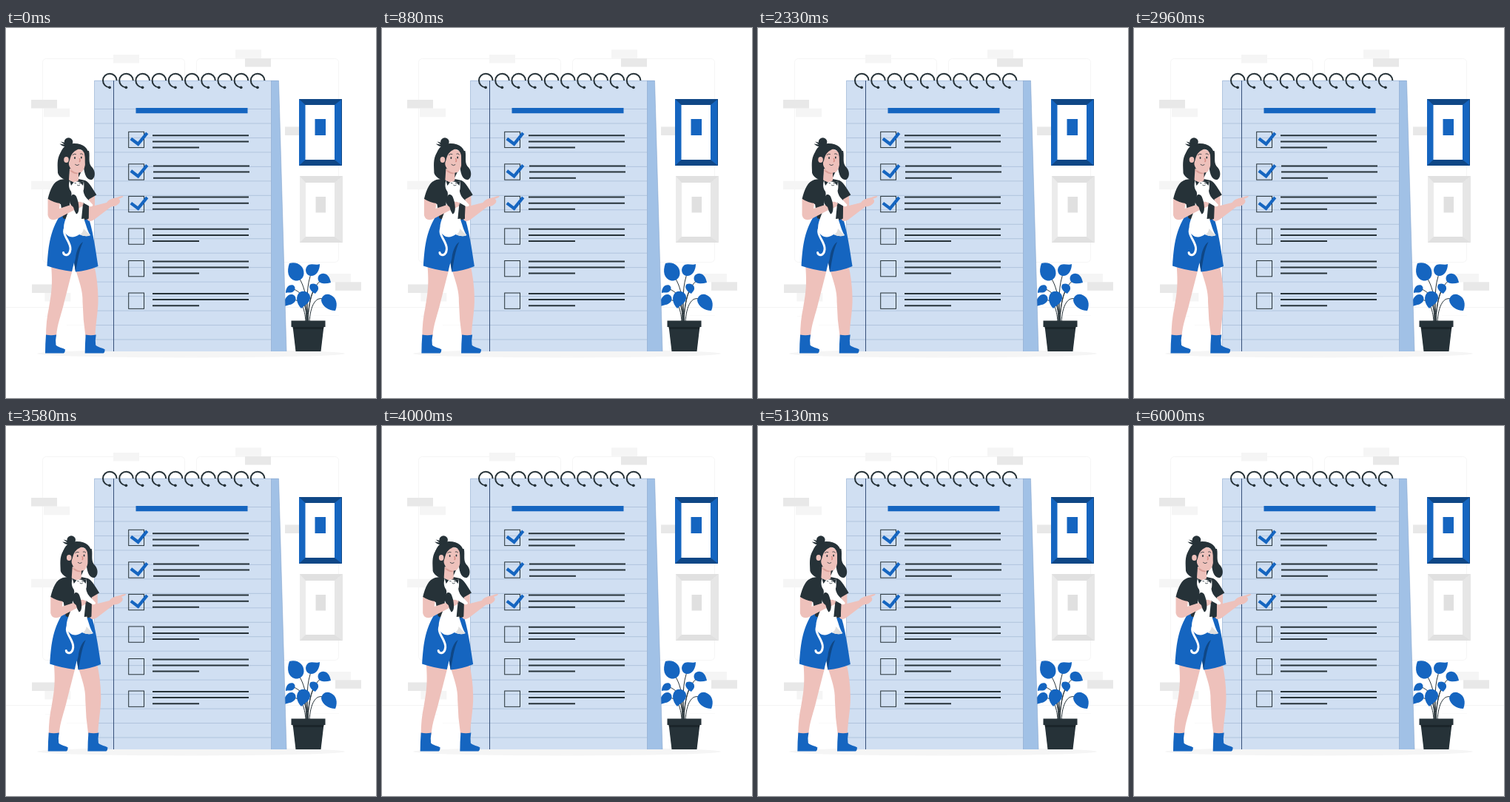
These frames come from a looping animation (500 by 500 pixels, 6.04 s). An HTML page:

```html
<!DOCTYPE html>
<html lang="en">
<head>
<meta charset="utf-8">
<title>Checklist</title>
<style>
  html, body { margin: 0; width: 100%; height: 100%; overflow: hidden; background: #fff; }
  svg { display: block; width: 100vw; height: 100vh; }
  .blue { fill: #1565c0; }
  .navy { fill: #0f4786; }
  .dark { fill: #263238; }
  .skin { fill: #eec1bb; }
  .white { fill: #fff; }
  .line { fill: none; stroke: #263238; }
</style>
</head>
<body>
<svg viewBox="0 0 500 500">
  <g id="wall">
    <g fill="none" stroke="#f3f3f3" stroke-width=".8">
      <rect x="49.5" y="41.5" width="192" height="275" rx="5"/>
      <rect x="257.5" y="41.5" width="192" height="275" rx="5"/>
      <path d="M0 377.5H500" stroke="#ededed" stroke-width=".6"/>
      <path d="M53 389.5H75M82 401.5H119M416 388.5H450" stroke-width=".5"/>
    </g>
  </g>
  <ellipse cx="250" cy="440" rx="208" ry="5.4" fill="#f5f5f5"/>

  <g id="pictures">
    <path class="blue" d="M396 96H454V186H396Z"/>
    <path class="navy" d="M396 96H454L444 104H404.500ZM396 186H454L444 178H404.500ZM453 96H454V186H453Z"/>
    <path class="white" d="M404.500 104H444V178H404.500Z"/>
    <path class="blue" d="M417.500 123H432V145H417.500Z"/>
    <path fill="#ebebeb" d="M397 200H455V290H397Z"/>
    <path fill="#e0e0e0" d="M397 200H455L444 209H405ZM397 290H455L444 282H405Z"/>
    <path fill="#e6e6e6" d="M455 200V290L444 282V209Z"/>
    <path class="white" d="M405 209H444V282H405Z"/>
    <path fill="#e0e0e0" d="M418.500 228H432V249.500H418.500Z"/>
  </g>

  <g id="plant">
    <path class="line" stroke-width="1" d="M406 397C407 375 407 349 391 331M408 397C407 371 405 347 414 328M408 397C409 362 418 343 430 339M406 397C406 369 402 357 386 352M405 397C404 380 399 364 384 368M407 397Q406 383 402 367M408 397Q408 372 416 352M410 397C411 378 418 355 437 371"/>
    <path class="blue" d="M383 318C394 315 403 322 402.500 332C402 339 396 342 391 341.500C381 339 379 329 383 318Z
      M424 319C424 328 419 336 411 335C404 333 403 324 409 320C414 318 420 321 424 319Z
      M439 344C432 346 424 346 422 341C420 335 425 331 430 332C436 333 438 339 439 344Z
      M378 358C378 351 382 346 388 347.500C392 350 391 355 387 357C384 358 381 357 378 358Z
      M375 377C375 367 380 359 387 360C393 362 393 369 388 372C384 375 379 374 375 377Z
      M399 379C392 372 391 362 397 357C403 354 410 357 411 363C412 371 404 374 399 379Z
      M418 359C411 356 408 349 412 346C417 344 423 347 422 353C421 356 419 357 418 359Z
      M445 382C436 382 427 376 426 368C427 361 433 358 439 361C446 364 449 373 445 382Z"/>
    <path class="dark" d="M387.500 403H429.500L425.500 437H391.500Z"/>
    <path fill="#1b252a" d="M387.500 403H429.500L429 407H388Z"/>
    <path class="dark" d="M385.500 395.500H431.500V404H385.500Z"/>
  </g>

  <g id="notebook">
    <path fill="#a1c1e6" d="M358 71H368.500L379 437H358Z"/>
    <path fill="#d0dff2" d="M119.500 71H358.500V437H119.500Z"/>
    <path fill="none" stroke="#7d9dc6" stroke-width=".5" d="M119.500 437V71.200H368.500L379 437M358.500 71V437"/>
    <g id="ruling" fill="none" stroke="#a3b8d4" stroke-width=".7"></g>
    <path fill="none" stroke="#365079" stroke-width="1" d="M145.500 71V437"/>
    <path class="blue" d="M175.500 108H326.500V115.300H175.500Z"/>
  </g>

  <g id="woman">
    <path class="skin" d="M61 320C63 345 62 356 58 378Q54 396 54 417H68C69 400 75 387 79 369L90 326Z"/>
    <path class="skin" d="M94 326C99 343 104 355 103.500 370Q104 394 107.500 417H120.500C121 398 125 382 124.500 364Q124 341 119 320Z"/>
    <path id="boot" class="blue" d="M54 414.500Q61 416 68 414.500Q66.500 422 67.500 428.500C71 432 77 432 80 434.500Q80 438 78 439.500H53Q53 427 54 414.500Z"/>
    <use href="#boot" x="53.700"/>
    <path class="blue" d="M74 252H110C117 270 121 299 124.500 322Q110 328 94 329.500L92 317L89 329Q72 327 55.500 321.500C57 301 58 275 74 252Z"/>
    <path class="navy" d="M104 289C99 292 95 301 94 311L92.300 318L94 329.500C97 315 98 302 104 289Z"/>

    <path class="dark" d="M74 168C68 177 70 187 70 196C74 206 87 209 98 202L105 187C106 201 111 206 116 205C121 202 121 194 117 189C110 183 114 174 112 166Z"/>
    <path class="skin" d="M113 226L120 225L120 240L136 236C140 230 147 230 150 229Q157 226 158.500 227.500Q158 229 152 231Q155 232 153.500 236Q150 241 142 241.500L119 259Q110 265 108 254Z"/>
    <path class="dark" d="M73 205Q91 201 107 206C113 209 117 217 122.300 225.500L112 231.500L111.500 258Q93 264 77 257L74 238Q64 237 56.500 231C60 217 64 208 73 205Z"/>
    <path class="skin" d="M86 190L85 205Q90 212 98 206L98 193Z"/>
    <path fill="#d99f98" d="M86 192Q90 198 97 197L97.500 194Z"/>
    <path class="skin" d="M84 166Q94 158 106 168C108 179 108 188 103 194C97 198 88 195 85 185Z"/>
    <path class="dark" d="M73 187C70 168 77 156 92 156C105 156 112 163 112 173C112 181 108 184 108 190C105 181 109 172 104 166Q100 163 97 164C91 167 88 170 86 179L84 184L85 194Q79 204 71 198Z"/>
    <circle class="dark" cx="84.500" cy="154" r="5.800"/>
    <path class="dark" d="M87 158Q79 163 72.500 156.500L79 157.500L74 153.500L84 156Z"/>
    <ellipse class="skin" cx="81.500" cy="178" rx="3.300" ry="4"/>
    <ellipse class="dark" cx="93" cy="175.500" rx=".9" ry="1.500"/>
    <ellipse class="dark" cx="101.800" cy="175" rx=".9" ry="1.500"/>
    <path class="line" stroke-width=".8" stroke-linecap="round" d="M90 171.500Q92 169.500 94.500 170.500M100.500 170Q102.500 169 104 171M93.500 184.500Q96 187 98.500 184.800"/>
    <path fill="none" stroke="#d58c84" stroke-width="1.500" d="M99 176Q101 179.500 99 181"/>

    <path class="white" fill="none" d="M86 206L91 208.500Q96 206.500 100 208.500L105 207Q106 216 104.500 220Q105 227 112 233L117.500 239Q117 242 113 241L104 236L106 260C109 269 111 276 114 280Q108 283 99 279C91 285 82 283 78.500 274C76 263 84 253 86 241C86 231 90 227 88 221C84 216 85 210 86 206Z"/>
    <path class="dark" d="M86 206L91.500 208.500L88 213ZM105 207L100 208.500L104 213Z"/>
    <path fill="#e0e0e0" d="M105 271Q109 276 114 280Q108 283 100 279Q104 277 105 271Z"/>
    <path class="line" stroke-width=".8" d="M92.500 209.500L95 210M98.500 209.500L101.500 210M96 212Q98 214 100 212"/>
    <path fill="none" stroke="#fff" stroke-width="3" stroke-linecap="round" d="M81 268C73 279 88 288 87 299C86 309 78 308 77.500 303.500"/>
    <path class="skin" d="M56.500 231Q65 236 73 237L72 244L89 238.500Q97 234 101 235Q106 236 105 240Q100 243 94 245L69 258Q59 262 56.500 253Z"/>
    <path class="dark" d="M90 225C95 224 96 230 97.500 235C99 243 99 250 95 251.500Q92 247 91 242Q86 239 86 233Q87 227 90 225Z"/>
    <path class="dark" d="M104 238L112 241L111.500 257L102 258Q103 247 104 238Z"/>
  </g>

  <g id="rings" class="line" stroke-width="2"></g>
  <g id="tasks" class="line"></g>
</svg>
<script>
  const byId = id => document.getElementById(id);
  const add = (id, markup) => byId(id).insertAdjacentHTML("beforeend", markup);
  const repeat = (count, draw) => Array.from({ length: count }, (_, i) => draw(i)).join("");

  const brick = (fill, spots) => spots.map(([x, y]) =>
    `<rect x="${x}" y="${y}" width="35" height="11.500" fill="${fill}"/>`).join("");
  add("wall",
    brick("#f5f5f5", [[145, 36], [310, 29.3], [51, 108.7], [34, 206.7], [52.3, 358], [431, 332]]) +
    brick("#e8e8e8", [[323, 41], [34, 97], [35, 346.5], [377, 133.5], [445, 343.3]]));

  add("ruling", repeat(17, i => `<path d="M119.500 ${109.5 + i * 19.47}H358.500"/>`));

  add("rings", repeat(10, i =>
    `<g transform="translate(${140.3 + i * 22.2} 71)">
      <path d="M9.300 0A9.300 9.300 0 1 0 -.3 9.300"/>
      <circle class="dark" cx="-.2" cy="9.300" r="1.900" stroke="none"/>
    </g>`));

  const textOffsets = [5, 2.6, 1.2, .9, .9, .9];
  add("tasks", textOffsets.map((offset, i) => {
    const top = 140.3 + i * 43.55;
    const x = i === 1 ? 199 : 198;
    const y = top + offset;
    const tick = `<path stroke="#1565c0" stroke-width="4.200" d="M168.800 ${top + 9.2}L178.500 ${top + 16.5}L190.700 ${top + 1.5}"/>`;
    return `<rect x="165.700" y="${top}" width="20.800" height="21.300" stroke-width="1"/>
      <path stroke-width="2" d="M${x} ${y}h130M${x} ${y + 8.1}h130M${x} ${y + 16.2}h63"/>
      ${i < 3 ? tick : ""}`;
  }).join(""));

  // Sideways shake: evenly spaced stops joined by straight lines, then a brief rest.
  const LOOP = 6040, STEP = 600;
  const stops = [0, -1, 2, -4, 4, -4, 4, -4, 2, -1, 0];

  function shake(ms) {
    const pos = Math.min(ms / STEP, stops.length - 1);
    const i = Math.min(Math.floor(pos), stops.length - 2);
    return stops[i] + (stops[i + 1] - stops[i]) * (pos - i);
  }

  const woman = byId("woman");
  let start;
  function render(now) {
    start ??= now;
    woman.setAttribute("transform", `translate(${shake((now - start) % LOOP)} 0)`);
    requestAnimationFrame(render);
  }
  requestAnimationFrame(render);
</script>
</body>
</html>
```
